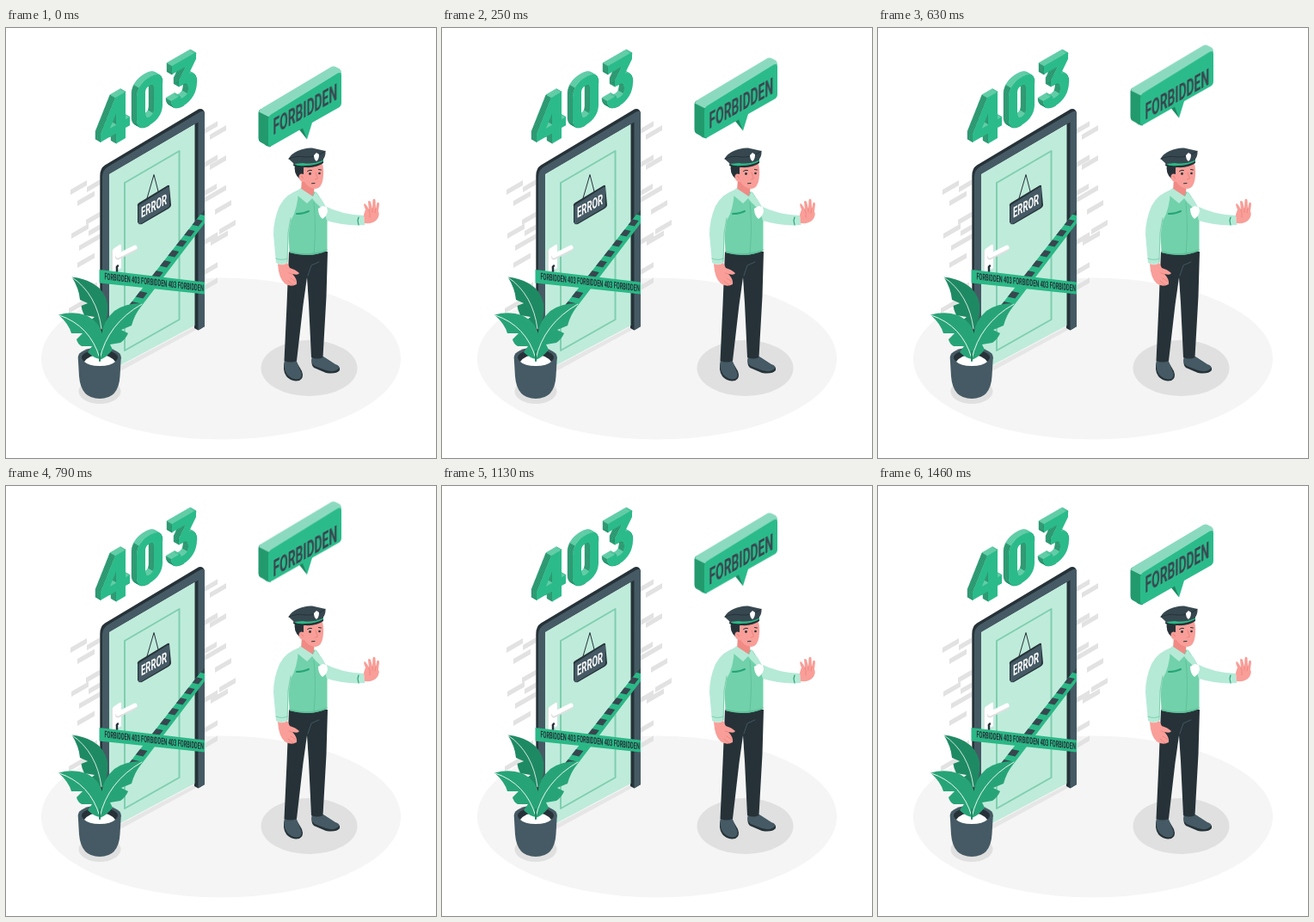
An HTML page for the animation above (1.5 s loop, 500 by 500 pixels).

```html
<!DOCTYPE html>
<html lang="en">
<head>
<meta charset="utf-8">
<title>403 Forbidden</title>
<style>
  html, body { margin: 0; width: 100%; height: 100%; overflow: hidden; background: #fff; }
  svg { display: block; width: 100vw; height: 100vh; }
  text { font-family: Roboto, "Open Sans", sans-serif; font-weight: 700; }
  .line { fill: none; stroke-linecap: round; stroke-linejoin: round; }
</style>
</head>
<body>
<svg viewBox="0 0 500 500">
  <ellipse cx="250" cy="384.500" rx="209" ry="94" fill="#f5f5f5"/>
  <ellipse cx="352.500" cy="395.500" rx="56" ry="32.500" fill="#e0e0e0"/>
  <ellipse cx="109" cy="422.500" rx="24.500" ry="14.500" fill="#e0e0e0"/>
  <path id="bricks" fill="#e2e2e2"/>
  <g id="digits"></g>

  <g id="door">
    <path fill="#e6e6e6" d="M120 400L222 346V350.500L120 406Z"/>
    <path fill="#263238" d="M109.300 401V172Q109.300 163 115 159.500L222 95.500Q226 93 229 95Q231 96.500 231 100V347L223.500 351.500L219 349V112L120 170V399Z"/>
    <path fill="#455a64" d="M112 400V173Q112 165 119 161L225 98Q231 94.500 231 100V347L223.500 351.500V109.500L120 170V399Z"/>
    <path fill="#bfebdb" d="M120 170L219.500 112V346L120 399Z"/>
    <path class="line" stroke="#7fcfae" stroke-width="2" d="M138 180L201.500 143V339L138 375Z"/>
    <path class="line" stroke="#263238" d="M164 198L172 170.500L177 190"/>
    <g transform="translate(0 -1)">
      <path fill="#263238" d="M153 208Q152 206 155 204L188 184Q190 183 190 185L192 207Q192 209 189 211L158 229Q155 230 153 227Z"/>
      <path fill="#455a64" d="M154 209Q154 207 156 206L188 186Q190 185 190 187V207Q190 209 188 210L156 229Q154 230 154 228Z"/>
      <text fill="#fff" font-size="17" transform="matrix(.56 -.31 0 1 157 222)">ERROR</text>
    </g>
    <path fill="#fff" d="M124 259Q124 257 126 256L132 252Q134 251 134 253V279L124 285Z"/>
    <path fill="#e0e0e0" d="M122.500 258L124 259V285L122.500 284Z"/>
    <path class="line" stroke="#e0e0e0" stroke-width="6" d="M130 266.500L149.500 256.500"/>
    <path class="line" stroke="#fff" stroke-width="5" d="M130 265L150 255"/>
    <path class="line" stroke="#263238" stroke-width="2.500" d="M130 276.500L128.800 278M129 279V283"/>
  </g>

  <clipPath id="band"><path d="M231 210.500V227L141 345L130 339Z"/></clipPath>
  <g clip-path="url(#band)">
    <path fill="#2bb886" d="M100 200H232V350H100Z"/>
    <path id="stripes" fill="#37474f"/>
  </g>
  <path fill="#2bb886" d="M108.500 281L231 295.500V309.500L108.500 296.500Z"/>
  <text fill="#263238" font-size="10.800" transform="matrix(.52 .063 0 1 114.500 292.300)">FORBIDDEN 403 FORBIDDEN 403 FORBIDDEN</text>

  <g id="plant">
    <path fill="#455a64" d="M83.700 383L85 405Q87 431 109 431T132.500 405L133.800 383Z"/>
    <ellipse cx="108.800" cy="382.500" rx="25" ry="11" fill="#455a64"/>
    <ellipse cx="109" cy="383" rx="21" ry="9" fill="#263238"/>
    <path fill="#fff" d="M91 388Q97 380 109 380T127 388Q122 393 109 393T91 388Z"/>
    <path fill="#1e8a63" d="M76.500 289.500Q91 291 101 297Q115 305 118 321Q119 338 113 350Q104 348 97 341L103 336L91 334Q88 328 87.500 323L95 320L86 316Q85 303 76.500 289.500Z"/>
    <path class="line" stroke="#fff" stroke-width=".8" d="M77 290Q106 310 111 350"/>
    <path fill="#27a477" d="M61 333.500Q78 329 93 334Q110 342 113 360L110 385Q102 384 95 377L100 370L88 370Q83 367 82 362L89 355L76 355Q73 344 61 333.500Z"/>
    <path class="line" stroke="#fff" stroke-width=".9" d="M62 334Q98 346 109 384"/>
    <path fill="#27a477" d="M159 320Q138 320 126 329Q113 340 111 358L109 386Q117 383 124 374L121 368L133 366Q139 362 142 355L134 351L146 346Q149 334 159 320Z"/>
    <path class="line" stroke="#fff" stroke-width=".9" d="M158 321Q118 344 109 385"/>
    <path class="line" stroke="#1e8a63" stroke-width="2" d="M109 376V387"/>
  </g>

  <g id="guard">
    <path fill="#263238" d="M324 387Q321 398 326 405Q332 412 341 410Q347 407 344 399L337 387Z"/>
    <path fill="#455a64" d="M324 386Q322 396 327 403Q333 410 341 408Q346 405 342 398L337 385Z"/>
    <path fill="#263238" d="M356 382Q354 392 358 395L372 401Q384 403 388 398V395L370 383Z"/>
    <path fill="#455a64" d="M356 382Q354 390 359 393L372 398Q382 401 387 396Q389 393 383 391L369 382Z"/>
    <path fill="#263238" d="M329 260H374L372.500 312L368.500 383Q362 386 355 383L352 320L350 290L345.500 322L338 387Q331 390 323.500 387L326.500 322Z"/>
    <path class="line" stroke="#455a64" stroke-width=".9" d="M351 288L355 276L364 272"/>
    <path fill="#71d1ab" d="M333 192L343 187L361 191L370 205Q375 214 373.500 227V259Q353 268 329.500 261L328 225Z"/>
    <path fill="#5dbf98" d="M329.500 259.500Q352 266 373.500 257.500V259Q353 268 329.500 261Z"/>
    <path fill="#b5ead7" d="M360 193Q367 197 371 207Q390 217 416 218L417.500 229Q396 231 373 224Q371 212 360 203Z"/>
    <path class="line" stroke="#27a477" stroke-width="1.200" d="M410 220L409 224L410 229"/>
    <path fill="#f99e98" d="M416 217L418 211Q415 205 417 204Q419 205 422 211L421 202Q422 200 424 202L426 210L426.500 200Q428 197 429.500 200L430 210L431.500 203Q434 202 434 205L433 213Q435 218 431 223Q427 228 417 227Z"/>
    <path class="line" stroke="#e87f7b" stroke-width=".7" d="M422 211Q424 216 423 220M426 210V214M430 210L429 215"/>
    <path fill="#b5ead7" d="M340 189Q326 192 318 207Q311 223 311 240L314 273Q321 277 327 273L329 238L331 224Q339 212 340 189Z"/>
    <path class="line" stroke="#7fcfae" stroke-width="1" d="M331 221L328 238L327 272M314 268Q321 271 327 268"/>
    <path fill="#f99e98" d="M316 274Q322 277 327 273L330 279Q337 281 341 285Q340 288 333 286Q339 292 338 298Q331 302 324 297Q317 291 316 274Z"/>
    <path class="line" stroke="#e87f7b" stroke-width=".7" d="M333 286L329 285M337 295L331 291M334 299L328 294"/>
    <path class="line" stroke="#27a477" stroke-width="2" d="M338 216Q346 216 352 213"/>
    <path class="line" stroke="#5dbf98" stroke-width=".9" d="M358 203Q361 230 358 263"/>
    <path fill="#fff" d="M363 210L368 207L373 208L374 213Q373 219 368 222Q363 218 363 210Z"/>
    <path fill="#f08a85" d="M344 175L359 181L358 191L356 197L343 189Z"/>
    <path fill="#b5ead7" d="M342 186L357 196L360 190L363 195L360 203L356 198L350 204L337 193Z"/>
    <path fill="#263238" d="M336 158Q334 169 341 175L346 178L349 159Z"/>
    <path fill="#f99e98" d="M346 160L368 158Q370 166 368.500 176Q367 186 360 187Q351 186 347 179Q341 179 340.500 173Q341 168 346 170Z"/>
    <path class="line" stroke="#e87f7b" stroke-width=".8" d="M343 172Q345 172 345.500 175M360 168L362.500 175L359.500 176"/>
    <path class="line" stroke="#263238" stroke-width="1" d="M350.500 166.500Q353 164.500 355.500 165.500M363.500 164.500L366.500 165M355.500 180.800L359 180.500"/>
    <circle cx="353.500" cy="169.500" r="1.400" fill="#263238"/>
    <circle cx="364.500" cy="169" r="1.300" fill="#263238"/>
    <path fill="#263238" d="M335 155L369 151L369 157Q361 163 348 162Q339 163 334 160Z"/>
    <path fill="#2bb886" d="M336 152Q350 158 368 150L369 155Q360 160 348 160Q339 161 335 158Z"/>
    <path fill="#37474f" d="M328.500 152Q332 146 339 143Q348 139 356 139.500L371.500 143Q372 149 368 154Q357 159 345 157L335 158Z"/>
    <path class="line" stroke="#263238" d="M329 152Q338 148 347 150Q360 151 371 143.500"/>
    <path fill="#fff" d="M358 148L361 145L364 147Q364 153 361 155Q358 153 358 148Z"/>
  </g>

  <g id="bubble">
    <path fill="#1d8761" d="M340 117L350 129.500L347 112Z"/>
    <path fill="#229a6e" d="M293.500 99Q293.500 95 297 94L308 102V138Q304 139 300 135L295.500 132.500Q293.500 131 293.500 128Z"/>
    <path fill="#8bdac0" d="M294 97.500Q294.500 95 298 93L376 46.500Q380 43.500 383 45L388 47.500Q390 49 390 53L309 103L305 103Z"/>
    <path fill="#2bbb8a" d="M305 106.500Q305 102.500 309 100L385 53Q390 50 390 55V87Q390 91 386 93L356 110L350 129.500L345 116.500L309 137Q305 139 305 135Z"/>
  </g>
  <g id="label">
    <text fill="#37474f" font-size="25.500" transform="matrix(.545 -.304 0 1 310.500 124.500)">FORBIDDEN</text>
  </g>
</svg>
<script>
const $ = id => document.getElementById(id);
const ISO = 0.577;

function add(parent, d, fill) {
  const el = document.createElementNS('http://www.w3.org/2000/svg', 'path');
  el.setAttribute('d', d);
  el.setAttribute('fill', fill);
  parent.append(el);
  return el;
}

// Wall bricks: left end, top, length
const bricks = [
  [75, 188, 19], [94, 185, 15], [83, 201, 20], [93, 223, 16], [76, 239, 20], [96, 236, 13],
  [85, 253, 24], [83, 273, 20], [73, 326, 22], [86, 307, 20],
  [231, 117, 15], [237, 124, 19], [231, 156, 15], [237, 159, 19], [231, 189, 14],
  [231, 197, 25], [243, 211, 19], [248, 234, 19], [231, 246, 15], [238, 247, 20],
  [231, 281, 15], [231, 299, 15]
];
$('bricks').setAttribute('d', bricks.map(([x, y, w]) =>
  `M${x} ${y}l${w} ${-w * ISO}v6l${-w} ${w * ISO}z`).join(''));

$('stripes').setAttribute('d', Array.from({ length: 13 }, (_, i) =>
  `M${238 - i * 9.2} ${212 + i * 12}l-26 -6l-5 6.500l26 6z`).join(''));

// Solid digits: outlines in wall coordinates, side faces shaded by direction
const digits = [
  [127, 107, ['M0 -26L12 -26L12 6L17 6L17 16L12 16L12 28L1 28L1 16L-17 16L-17 7Z', 'M1 -7L-6 6L1 6Z']],
  [167, 85, ['M0 -28C10 -28 15 -22 15 -13L15 13C15 22 10 28 0 28C-10 28 -15 22 -15 13L-15 -13C-15 -22 -10 -28 0 -28Z',
    'M0 -18C-4 -18 -5 -16 -5 -12L-5 12C-5 16 -4 18 0 18C4 18 5 16 5 12L5 -12C5 -16 4 -18 0 -18Z']],
  [207, 61, ['M-14 -25L12 -25Q14 -25 14 -23L14 -17L6 -5C12 -3 15 3 15 11C15 22 9 29 0 29C-9 29 -15 24 -15 15L-5 15C-5 18 -3 19 0 19C3 19 5 17 5 12C5 7 3 4 -1 4L-6 4L-6 -3L2 -15L-14 -15Z']]
];
const depth = 6;
for (const [cx, cy, outline] of digits) {
  const g = $('digits');
  const sides = [];
  for (const d of outline) {
    const probe = add(g, d, 'none');
    const len = probe.getTotalLength(), n = Math.ceil(len);
    const pts = Array.from({ length: n + 1 }, (_, i) => probe.getPointAtLength(len * i / n));
    probe.remove();
    for (let i = 0; i < n; i++) {
      const a = pts[i], b = pts[i + 1];
      const up = b.x - a.x, left = a.y - b.y;
      if (up <= 0 && left <= 0) continue;
      const at = p => `${cx + p.x} ${cy + p.y - p.x * ISO}`;
      const back = p => `${cx + p.x - depth} ${cy + p.y - (p.x + depth) * ISO}`;
      sides.push({
        order: a.x + a.y,
        d: `M${at(a)}L${at(b)}L${back(b)}L${back(a)}Z`,
        fill: up > Math.abs(left) * 0.7 ? '#57c9a1' : '#21946a'
      });
    }
  }
  sides.sort((a, b) => b.order - a.order);
  for (const s of sides) {
    const el = add(g, s.d, s.fill);
    el.setAttribute('stroke', s.fill);
    el.setAttribute('stroke-width', 0.4);
  }
  const face = add(g, outline.join(''), '#2bbb8a');
  face.setAttribute('fill-rule', 'evenodd');
  face.setAttribute('transform', `matrix(1 ${-ISO} 0 1 ${cx} ${cy})`);
}

// Rise and fall at 24 pictures a second
const LOOP = 1500, LAST = 35;
function float(id, height) {
  const steps = Array.from({ length: LAST + 1 }, (_, k) => ({
    offset: Math.round(k * 25 / 6) * 10 / LOOP,
    transform: `translateY(${-height * (1 - Math.abs(2 * k / LAST - 1))}px)`,
    easing: 'steps(1)'
  }));
  steps.push({ offset: 1, transform: 'translateY(0px)' });
  $(id).animate(steps, { duration: LOOP, iterations: Infinity });
}
float('bubble', 29);
float('label', 20.5);
</script>
</body>
</html>
```
